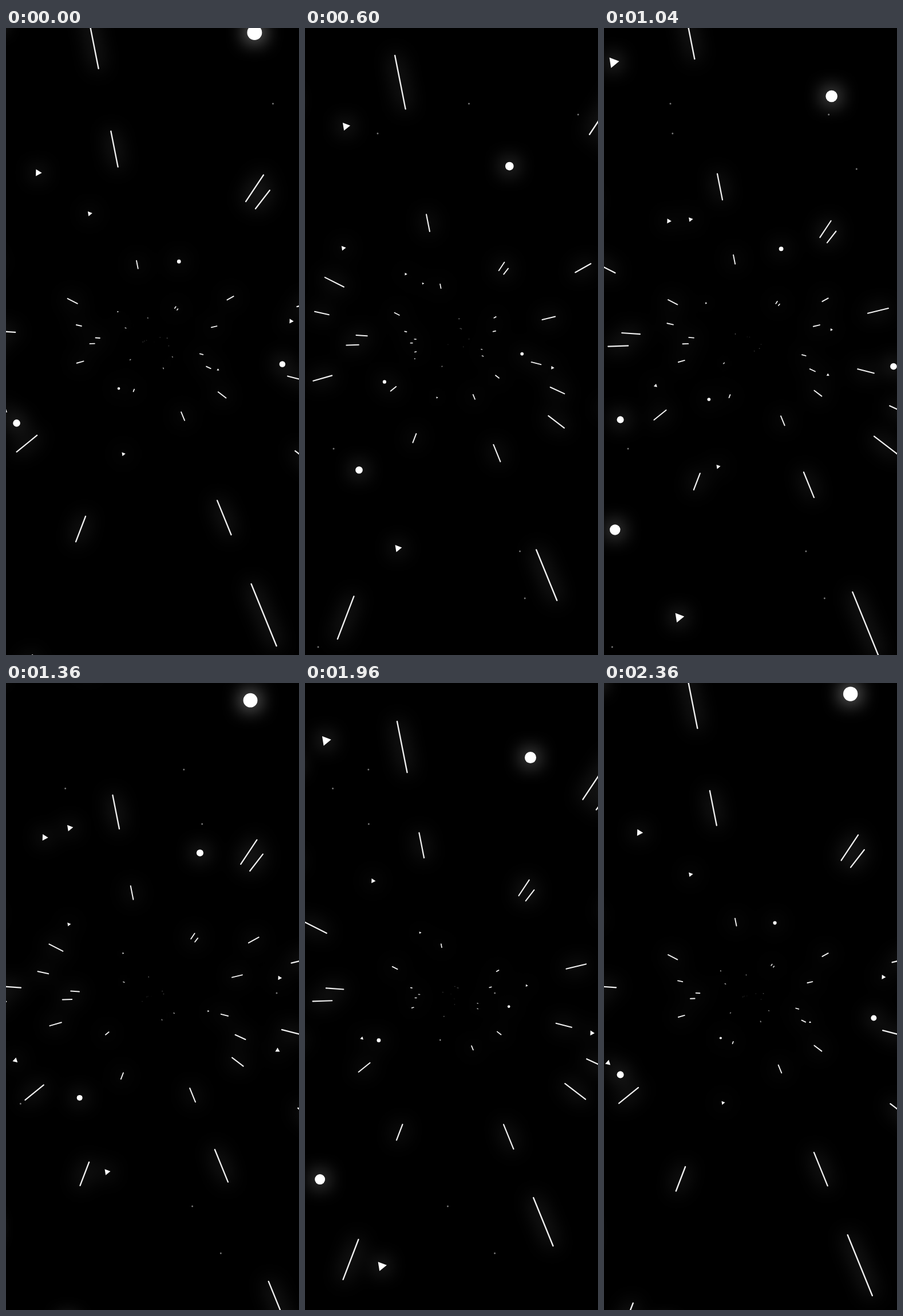
An HTML page for the animation above (2400 ms loop, 512 px wide and 1094 px high).

```html
<!DOCTYPE html>
<html lang="en">
<head>
<meta charset="utf-8">
<title>Starfield</title>
<style>
  html, body { margin: 0; width: 100%; height: 100%; background: #000; overflow: hidden; }
  svg { display: block; width: 100%; height: 100%; }
</style>
</head>
<body>
<svg viewBox="0 0 512 1094">
  <defs>
    <filter id="glow" filterUnits="userSpaceOnUse" x="-80" y="-80" width="672" height="1254"
            color-interpolation-filters="sRGB">
      <feGaussianBlur stdDeviation="17" result="halo"/>
      <feMerge><feMergeNode in="halo"/><feMergeNode in="SourceGraphic"/></feMerge>
    </filter>
  </defs>
  <rect width="512" height="1094" fill="#000"/>
  <g id="dust" fill="#777"></g>
  <g id="sparks" filter="url(#glow)" fill="#fff" stroke-linecap="round"></g>
</svg>
<script>
const LOOP = 2400, STEP = 40;
const CX = 256, CY = 547.3, REACH = 650;
const GAP = 960, WIDE_GAP = 1080; // ms between the two emissions on a ray

const rad = deg => deg * Math.PI / 180;
const mod = (v, n) => ((v % n) + n) % n;
const updates = [];

function set(el, attrs) {
  for (const key in attrs) el.setAttribute(key, attrs[key]);
}

function make(parent, tag, attrs) {
  const el = document.createElementNS("http://www.w3.org/2000/svg", tag);
  document.getElementById(parent).appendChild(el);
  set(el, attrs);
  return el;
}

function show(el, visible) {
  el.style.display = visible ? "" : "none";
  return visible;
}

// Shapes fly out from the centre along rays [angle, birth]; each may live for two loops.
function family({ tag, attrs, travel, pose }, rays, wideRays = []) {
  const emit = gap => ([angle, birth]) => {
    const ux = Math.cos(rad(angle)), uy = Math.sin(rad(angle));
    const at = d => [CX + ux * d, CY + uy * d];
    for (const start of [birth, birth + gap]) {
      for (const extra of [0, LOOP]) {
        const el = make("sparks", tag, attrs);
        updates.push(t => {
          const age = mod(t - start, LOOP) + extra;
          const d = travel(age);
          if (!show(el, d < REACH)) return;
          set(el, { opacity: Math.min(1, d / 75), ...pose(d, at, age) });
        });
      }
    }
  };
  rays.forEach(emit(GAP));
  wideRays.forEach(emit(WIDE_GAP));
}

// Streaks speed up and grow as they approach.
function streak(rate, stretch) {
  const depth = age => age * rate / 1000;
  return {
    tag: "line",
    attrs: { stroke: "#f0f0f0" },
    travel(age) {
      const k = depth(age);
      return 83.1 * k + 4.03 * k ** 2 + 3.06 * k ** 3;
    },
    pose(d, at, age) {
      const k = depth(age);
      const width = Math.min(2.4, 1.5 + .3 * k);
      const half = Math.max(.1, (7.57 * stretch * k ** 2.12 - width / 2) / 2);
      const [x1, y1] = at(d - half), [x2, y2] = at(d + half);
      return { x1, y1, x2, y2, "stroke-width": width };
    }
  };
}

function triangle(speed, tilt) {
  const corners = [0, 120, 240].map(a => [Math.cos(rad(a)), Math.sin(rad(a))]);
  return {
    tag: "polygon",
    attrs: { points: corners.join(" ") },
    travel: age => age * speed,
    pose: (d, at) => ({
      transform: `translate(${at(d)}) rotate(${tilt}) scale(${Math.max(.9, d * .0195)})`
    })
  };
}

function disc(speed) {
  return {
    tag: "circle",
    attrs: {},
    travel: age => age * speed,
    pose(d, at) {
      const [cx, cy] = at(d);
      return { cx, cy, r: Math.max(.8, d * .0228) };
    }
  };
}

// Dust drifts left from a resting point [x, y, time], with constant acceleration.
function dust(accel, from, until, specks) {
  for (const [x, y, rest] of specks) {
    const el = make("dust", "circle", { r: 1.5, cy: y });
    updates.push(t => {
      if (!show(el, t >= from && t < until)) return;
      set(el, { cx: x - accel * ((t - rest) / 1000) ** 2 });
    });
  }
}

family(streak(.925, .98), [[67.8, 812], [-13.6, 1103], [183.9, 1257]], [[206.9, 662]]);
family(streak(.988, .92), [[258.8, 943], [14.3, 1407], [178.1, 1238]], [[37.4, 804]]);
family(streak(1.315, .67), [[111, -768], [-52.2, -613], [192.4, -1058]], [[-29.2, 1183]]);
family(streak(1.343, .88), [[-56.3, -604], [24.7, -872], [141, -430]], [[164.2, 1366]]);
family(triangle(.2545, 2), [[-8.4, 479], [235.8, 40]], [[14.5, -115]]);
family(triangle(.283, -9), [[220.8, -283], [104.6, -716]], [[243.8, -880]]);
family(triangle(.2545, -78), [[155.1, 322]]);
family(triangle(.283, -90), [[23.2, -440]]);
family(disc(.2922), [[-71.7, -504], [125.8, -345], [9.8, -788]], [[149.1, -947]]);

dust(84, 0, 2200, [[549, 151, -324], [652, 132, -1486], [677, 246, -635], [575, 541, 258]]);
dust(45, 300, 2200, [[127, 184, 640], [381, 913, 250], [387, 995, 850], [50, 734, 620], [23, 1080, 600]]);

const begin = performance.now();
let shown = -1;

function tick() {
  const t = Math.floor((performance.now() - begin) % LOOP / STEP) * STEP;
  if (t !== shown) updates.forEach(update => update(t));
  shown = t;
  requestAnimationFrame(tick);
}

tick();
</script>
</body>
</html>
```
